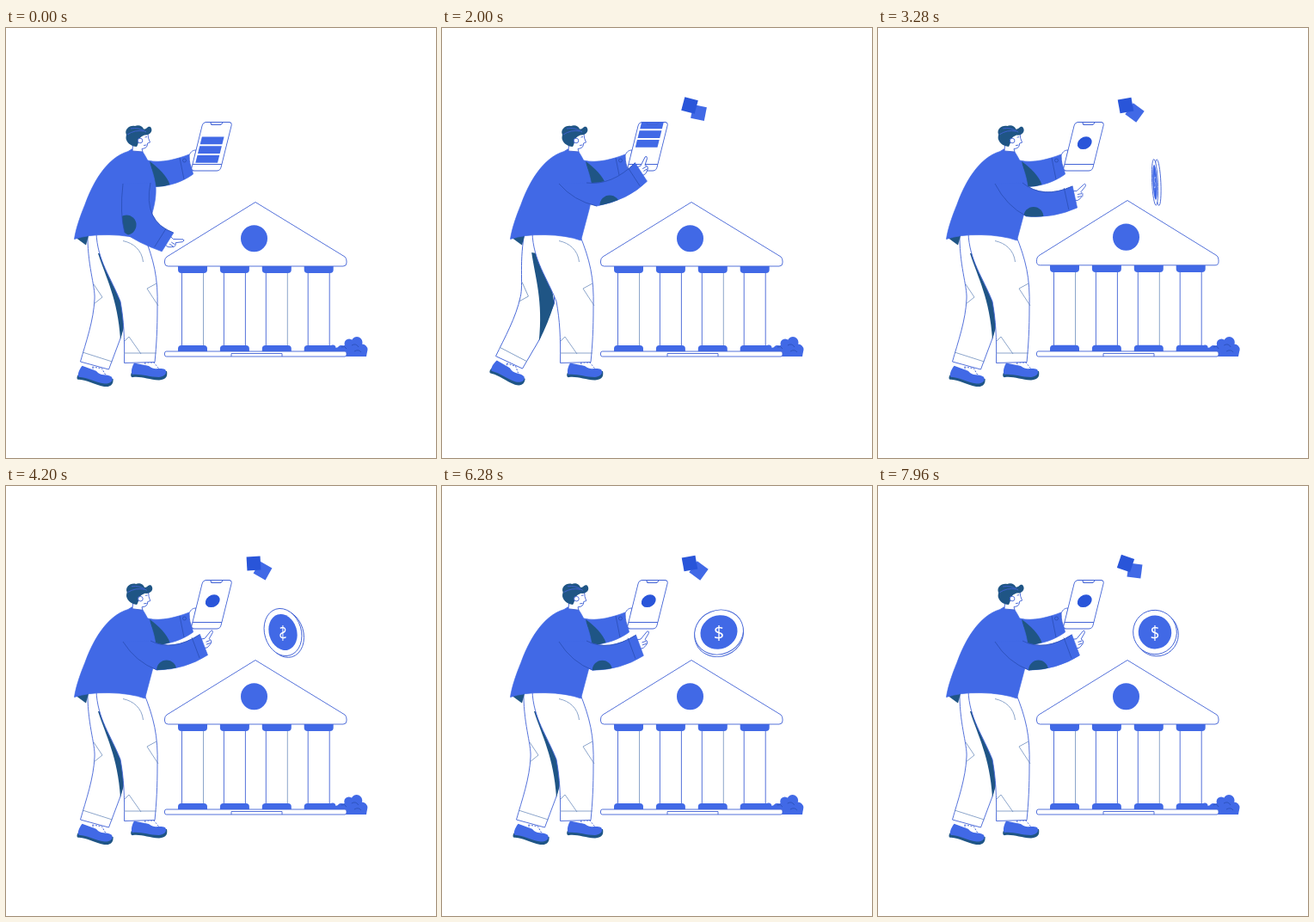
These frames come from a looping animation (500x500 px, 8000 ms). An HTML page:

```html
<!DOCTYPE html>
<html lang="en">
<head>
<meta charset="utf-8">
<title>Mobile banking</title>
<style>
  html, body { margin: 0; width: 100%; height: 100%; overflow: hidden; background: #fff; }
  svg { display: block; width: 100vw; height: 100vh; }
  .line { fill: none; stroke: #4263d6; stroke-width: .9; }
  .thin { fill: none; stroke: #6f8fbe; stroke-width: .8; }
  .fold { fill: none; stroke: #2a4fb4; stroke-width: .8; }
  .white { fill: #fff; stroke: #4263d6; stroke-width: .9; stroke-linejoin: round; }
  .blue { fill: #4169e6; }
  .cloth { fill: #4169e6; stroke: #4169e6; stroke-width: .7; stroke-linejoin: round; }
  .deep { fill: #2955d9; }
  .teal { fill: #1f5585; }
  text { font: 22px "Open Sans", Lato, sans-serif; fill: #fff; text-anchor: middle; }
</style>
</head>
<body>
<svg viewBox="0 0 500 500">
  <defs>
    <clipPath id="screen"><rect x="222.5" y="109.5" width="33" height="49" rx="3"/></clipPath>
    <clipPath id="sleeveClip"><path class="sleeve"/></clipPath>
    <g id="shoe">
      <path class="white" d="M161 389 L172 389 L181 400 L166 399 Z" stroke-dasharray="2 1.5"/>
      <path class="teal" d="M147 399 C144 403 145 407 148 406 C158 405 166 409 178 409.5 C187 409 188 404 187 399 Z"/>
      <path class="blue" d="M149 389.5 C146 395 145 400 147 403 C158 402 166 406 178 406 C185 405 188 401 185 397 C178 394 173 399 166 393 Z"/>
    </g>
  </defs>

  <g id="coin">
    <ellipse class="white" id="rim"/>
    <ellipse class="white" id="face"/>
    <ellipse class="blue" id="core"/>
    <text id="sign" y="8">$</text>
  </g>

  <g id="bush" class="blue">
    <circle cx="380" cy="372" r="3.5"/><circle cx="390" cy="374" r="5"/>
    <circle cx="399" cy="367" r="5.5"/><circle cx="408" cy="365.5" r="6.5"/>
    <circle cx="414" cy="374" r="6.5"/>
    <path d="M377 373 L388 371 L402 366 L414 370 L420 376 L419 382 L377 382 Z"/>
    <path class="fold" d="M390 371 q4 -2 6 2 M402 369 q5 -3 8 2 M405 376 q5 -3 8 1"/>
  </g>

  <g id="bank">
    <g id="pillars"></g>
    <path class="white" d="M290 202.5 L394 266 Q396 268 396 271 V273 Q396 277 392 277 H188.5 Q184.5 277 184.5 273 V271 Q184.5 268 187 266 Z"/>
    <circle class="blue" cx="288.5" cy="244.7" r="15.5"/>
    <rect class="white" x="184.5" y="376" width="211.5" height="6" rx="2"/>
    <path class="line" d="M262 382 V378.5 H321 V382"/>
  </g>

  <g id="backLeg">
    <use href="#shoe" transform="translate(87.5 393) rotate(9) translate(-148 -390)"/>
    <path class="white" d="M95 236 C94 275 104 300 103 315 C102 340 93 365 86.5 388 L119.5 397 L133 361 L143 316 L130 236 Z"/>
    <path class="teal" d="M107 262 C116 290 130 315 133 362 Q140 340 143 316 L125 262 Z"/>
    <path class="thin" d="M89 377 L123.5 388 M102 298 L112 313 L102 321"/>
  </g>
  <use href="#shoe"/>
  <path class="white" d="M105 238 C106 270 122 290 133 318 C137 340 138 360 137.5 389.5 L173 388.5 C175 368 176 350 176 325 C177 290 172 270 160 240 Z"/>
  <path class="thin" d="M137.5 378 L175 378 M136 247.5 C148 250 158 258 159.5 272 M175 297 L164 303 L177 323 M138 364 L143 359 L157 379"/>

  <path class="teal" d="M80 243 L93 252.5 L97 238 Z"/>
  <path class="cloth" d="M165 154 C180 158 200 152 213 147 L217.5 170 C205 179 190 184 174 184.5 L160 160 Z"/>
  <path class="teal" d="M167 155 C178 163 187 172 190.5 182 Q182 185 174 184.5 Z"/>
  <path class="fold" d="M202 151 L207 176"/><circle class="fold" cx="207.5" cy="154" r="2"/>
  <path class="cloth" d="M146 141 L142 143.5 C117 151 101 180 92 205 C85 222 81 235 79.5 245.5 Q95 240 120 240.5 Q145 241 161.5 247 L170 215 C174 201 174.5 192 174 184 C172 170 168 158 159 144 Z"/>
  <path class="fold" d="M146 141 Q152 145 159 143"/>
  <path class="white" d="M213 148 C215 143 218 142 221 142 L217 164 Q213 160 213 148 Z"/>

  <g transform="translate(34.4 0) skewX(-14)">
    <rect class="white" x="222" y="109.5" width="34" height="56.5" rx="4"/>
    <g id="bars" class="blue" clip-path="url(#screen)"></g>
    <ellipse class="deep" id="dot" cx="239.2" cy="133.7"/>
    <path class="line" d="M222 158.5 H256 M231 109.8 Q231.5 112.5 234 112.5 H242 Q244.5 112.5 245 109.8"/>
  </g>

  <g id="head">
    <path class="white" d="M147 143 L148 130 L155 123 L165 123.5 Q165 128 167.5 133 L164.5 134 Q165 140 158 140.5 L159 144 Z"/>
    <path class="teal" d="M140 124 C137 118 144 112.5 150 114 C154 112 159 114 160 117.5 C164 118 164 113.5 168 115 C172 120 167 125 161 124.5 L158 126 C154 128 155 133 152 138 C145 138 139 132 139.5 127 Z"/>
    <path class="line" d="M141 124 Q150 118 160 120 M145 117 Q154 115 163 121"/>
    <circle class="white" cx="156" cy="131" r="2.8"/>
    <path class="line" d="M161.5 127 l2.5 -.5 M160 136.5 l3.5 -.5"/>
  </g>

  <g id="hand">
    <path class="white" d="M-2 -7 L2 -7 L10.5 -15 Q13 -16 12 -12.5 L7 -6 L9 -4 Q10 -1 7 1 Q4 5 0 4 L-2 4 Z"/>
    <path class="line" d="M3 -3 L8 -4 M3 0 L8 -1"/>
  </g>
  <path class="sleeve cloth"/>
  <circle class="teal" id="patch" r="11.5" clip-path="url(#sleeveClip)"/>
  <path class="fold" id="seams"/>

  <rect id="tileB" class="blue" x="-8" y="-8" width="16" height="16"/>
  <rect id="tileA" class="deep" x="-8" y="-8" width="16" height="16"/>
</svg>
<script>
const LOOP = 8000, TAU = 2 * Math.PI;
const $ = id => document.getElementById(id);
const set = (el, attrs) => { for (const k in attrs) el.setAttribute(k, attrs[k]); };
const mix = (a, b, k) => a + (b - a) * k;
const wave = (t, period) => Math.cos(TAU * t / period);
const progress = (t, from, to) => Math.min(1, Math.max(0, (t - from) / (to - from)));
const ramp = (t, from, to) => (1 - Math.cos(Math.PI * progress(t, from, to))) / 2;
const step = ([x, y], degrees, length) => {
  const a = degrees * Math.PI / 180;
  return [x + length * Math.cos(a), y + length * Math.sin(a)];
};

for (let i = 0; i < 4; i++) {
  const x = 200 + 48.9 * i;
  $("pillars").innerHTML += `
    <path class="line" d="M${x + 4.5} 284 V371"/>
    <path class="${i % 2 ? "line" : "thin"}" d="M${x + 29.5} 284 V371"/>
    <path class="blue" d="M${x} 277 h34 v4 q0 4 -4 4 h-26 q-4 0 -4 -4 Z"/>
    <path class="blue" d="M${x} 376 v-3 q0 -4 4 -4 h26 q4 0 4 4 v3 Z"/>`;
}
for (let i = 0; i < 3; i++)
  $("bars").innerHTML += `<rect x="225" width="25.7" height="8.7"/>`;

// Arm hanging, reaching out, touching the phone.
const poses = [
  { elbow: [138, 238], wrist: [188, 249], patch: [140, 229], turn: 32 },
  { elbow: [170, 223], wrist: [228, 206.5], patch: [176, 224], turn: -5 },
  { elbow: [180, 207], wrist: [231.5, 167.5], patch: [195, 206], turn: -33 }
];
const armpit = [168, 180], shoulder = [136, 181];
const sleeves = document.querySelectorAll(".sleeve");

function drawArm(t) {
  const lift = ramp(t, 120, 1000) + ramp(t, 1300, 1850);
  const tap = 1.4 + .17 * wave(t - 100, 2000);
  const p = mix(lift, tap, ramp(t, 2080, 2700));
  const i = p < 1 ? 0 : 1, a = poses[i], b = poses[i + 1];
  const point = key => a[key].map((v, n) => mix(v, b[key][n], p - i));
  const elbow = point("elbow"), wrist = point("wrist"), patch = point("patch");
  const turn = mix(a.turn, b.turn, p - i);

  const top = step(wrist, turn - 90, 12.8), bottom = step(wrist, turn + 90, 12.8);
  const bend = turn + 168;
  const upper = `M${armpit}Q${step(top, bend, 38)} ${top}`;
  const sag = [(elbow[0] + shoulder[0]) / 2 - 5, (elbow[1] + shoulder[1]) / 2 + 7];
  const back = `Q${sag} ${shoulder}`;
  const outline = `${upper}L${bottom}Q${step(bottom, bend, 31)} ${elbow}${back}Z`;
  sleeves.forEach(el => set(el, { d: outline }));

  const cuff = `M${step(top, turn + 180, 10)}L${step(bottom, turn + 180, 10)}`;
  set($("seams"), { d: `${upper}M${elbow}${back}${cuff}` });
  set($("patch"), { cx: patch[0], cy: patch[1] });
  set($("hand"), { transform: `translate(${wrist}) rotate(${turn + 13})` });
}

function drawCoin(t) {
  $("coin").style.display = t < 2900 ? "none" : "";
  const spin = t - 6296, front = wave(spin, 800), side = wave(spin - 200, 800);
  const rx = 29 * Math.abs(front), ry = 29 * (.93 - .05 * front);
  const lean = `rotate(${-23 * Math.abs(front)})`;
  set($("coin"), { transform: `translate(322 ${mix(240, 170, ramp(t, 2900, 3400))})` });
  set($("rim"), { rx, ry, transform: `translate(${.5 + 3 * side} ${2.5 * Math.abs(front)}) ${lean}` });
  set($("face"), { rx, ry, transform: lean });
  set($("core"), { rx: rx * .76, ry: ry * .76, transform: lean });
  set($("sign"), { transform: `scale(${front} 1)` });
}

function drawPhone(t) {
  const scroll = 18 * ramp(t, 1450, 1900);
  [...$("bars").children].forEach((bar, i) => set(bar, { y: 126.5 + 10.8 * i - scroll }));
  set($("bars"), { opacity: 1 - ramp(t, 2400, 2600) });
  const grow = ramp(t, 2500, 2800);
  set($("dot"), { rx: 8.2 * grow, ry: 7.4 * grow });
}

function drawTiles(t) {
  const size = ramp(t, 250, 650), spin = .09 * t;
  set($("tileA"), { transform: `translate(288 90) rotate(${15 - spin}) scale(${size})` });
  set($("tileB"), { transform: `translate(298.5 98.5) rotate(${11 + spin}) scale(${size})` });
}

function draw(t) {
  drawArm(t);
  drawCoin(t);
  drawPhone(t);
  drawTiles(t);
  const stride = 9.8 * (ramp(t, 840, 1500) - ramp(t, 2400, 3150));
  const nod = 3 * ramp(t, 2500, 5100) - 2.5 * ramp(t, 5200, LOOP);
  const hop = 1 + Math.sin(Math.PI * progress(t, 3000, 3560)) / 90;
  set($("backLeg"), { transform: `rotate(${stride} 112 245)` });
  set($("head"), { transform: `rotate(${nod} 152 141)` });
  set($("bank"), { transform: `translate(0 382) scale(1 ${hop}) translate(0 -382)` });
  set($("bush"), { transform: `translate(398 382) skewX(${1.5 * wave(t - 500, 2000)}) translate(-398 -382)` });
}

const start = performance.now();
function tick() {
  draw((performance.now() - start) % LOOP);
  requestAnimationFrame(tick);
}
tick();
</script>
</body>
</html>
```
